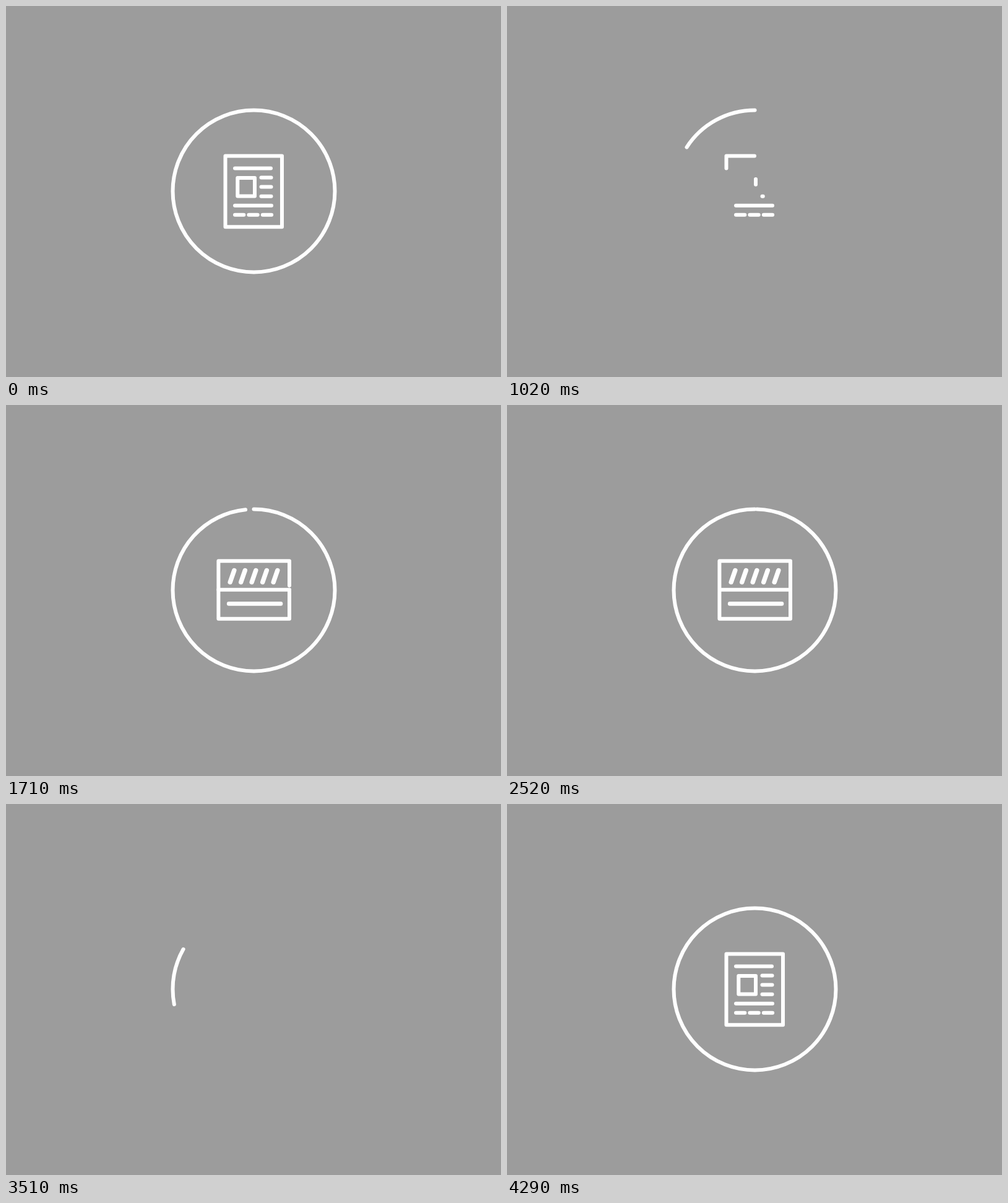
An HTML page for the animation above (4500 ms loop, 800 by 600 pixels).

```html
<!DOCTYPE html>
<html lang="en">
<head>
<meta charset="utf-8">
<title>Icon loop</title>
<style>
  html, body { margin: 0; width: 100%; height: 100%; overflow: hidden; background: #9c9c9c; }
  svg { display: block; width: 100vw; height: 100vh; }
  path { fill: none; stroke: #fff; stroke-linecap: round; stroke-linejoin: round; }
</style>
</head>
<body>
<svg id="stage" viewBox="0 0 800 600"></svg>
<script>
const LOOP = 4500, STEP = 30, HALF = 72;
const stage = document.getElementById('stage');
const shapes = [];

const bezier = (t, a, b) => 3 * (1 - t) ** 2 * t * a + 3 * (1 - t) * t * t * b + t ** 3;

// Gentle start, long soft landing.
function ease(x) {
  if (x <= 0) return 0;
  if (x >= 1) return 1;
  let lo = 0, hi = 1;
  for (let i = 0; i < 24; i++) {
    const mid = (lo + hi) / 2;
    if (bezier(mid, 0.33, 0.2) < x) lo = mid; else hi = mid;
  }
  return bezier(lo, 0, 1);
}

const span = (start, length) => ({ start, length });
const progress = (step, { start, length }) => ease((step - start) / length);

function makePath(d, width = 6) {
  const path = document.createElementNS('http://www.w3.org/2000/svg', 'path');
  path.setAttribute('d', d);
  path.setAttribute('pathLength', 1);
  path.setAttribute('stroke-width', width);
  return stage.appendChild(path);
}

function trim(path, from, to) {
  const length = to - from;
  path.style.display = length > 0 ? '' : 'none';
  path.style.strokeDasharray = length >= 1 ? 'none' : `${length} 2`;
  path.style.strokeDashoffset = -from;
}

// Forward shapes vanish from their start, others retract from their end.
function add(d, draw, erase, { forward = false, width } = {}) {
  shapes.push({ path: makePath(d, width), draw, erase, forward });
}

const line = (x, y, length) => `M${x} ${y}h${length}`;
const ring = 'M400.5 168.5a131 131 0 0 1 0 262a131 131 0 0 1 0-262';
const outline = { forward: true };

function addNewspaper() {
  const left = 370, fullWidth = 59, dashWidth = 14.3;
  const rowY = row => 262.5 + 15.06 * row;
  const frameIn = span(119, 24), frameOut = span(20.8, 24);
  add(ring, frameIn, frameOut, outline);
  add('M400 242.6H446V357.2H354.5V242.6H400', frameIn, frameOut, outline);

  const articleIn = row => span(122 + 2 * row, 6);
  const articleOut = row => span(24 + 2 * row, 6);
  add(line(left, rowY(0), fullWidth - 1), articleIn(0), articleOut(0));
  for (let row = 1; row <= 3; row++) {
    add(line(412.5, rowY(row), 16), articleIn(row), articleOut(row));
  }
  add('M402 280V307.6H374.3V278H402V280', articleIn(3), articleOut(3));

  const footerIn = i => span(133 + 2 * i, 4);
  const footerOut = i => span(34 + 2.93 * i, 4);
  add(line(left, rowY(4), fullWidth), footerIn(0), footerOut(0));
  for (let i = 1; i <= 3; i++) {
    add(line(left + 22.4 * (3 - i), rowY(5), dashWidth), footerIn(i), footerOut(i));
  }
}

function addClapperboard() {
  const left = 343.4, width = 114.6, middle = 298.8;
  const frameIn = span(37, 24), frameOut = span(83, 28);
  add(ring, frameIn, frameOut, outline);
  add(`M458 ${middle}V345.8H${left}V252.2H458V${middle}`, frameIn, frameOut, outline);
  add(line(left, middle, width), span(45, 12), frameOut, outline);
  add(line(360.2, 321.4, 83.8), span(51, 6), span(100, 6), { width: 6.6 });
  for (let i = 0; i < 5; i++) {
    add(`M${362.2 + 17.5 * i} 286.4l6.6-18.8`, span(46 + i, 6), span(101 + i, 6), { width: 7.4 });
  }
}

addNewspaper();
addClapperboard();
const spinner = makePath(ring);

function render(time) {
  const step = Math.floor((time % LOOP) / STEP);
  for (const { path, draw, erase, forward } of shapes) {
    const entering = (step > HALF) === (draw.start > erase.start);
    if (entering) {
      trim(path, 0, progress(step, draw));
    } else {
      const gone = progress(step, erase);
      trim(path, forward ? gone : 0, forward ? 1 : 1 - gone);
    }
  }
  trim(spinner, progress(step, span(103.7, 30)), progress(step, span(100.8, 30)));
}

const origin = performance.now();
function tick() {
  render(performance.now() - origin);
  requestAnimationFrame(tick);
}
render(0);
requestAnimationFrame(tick);
</script>
</body>
</html>
```
